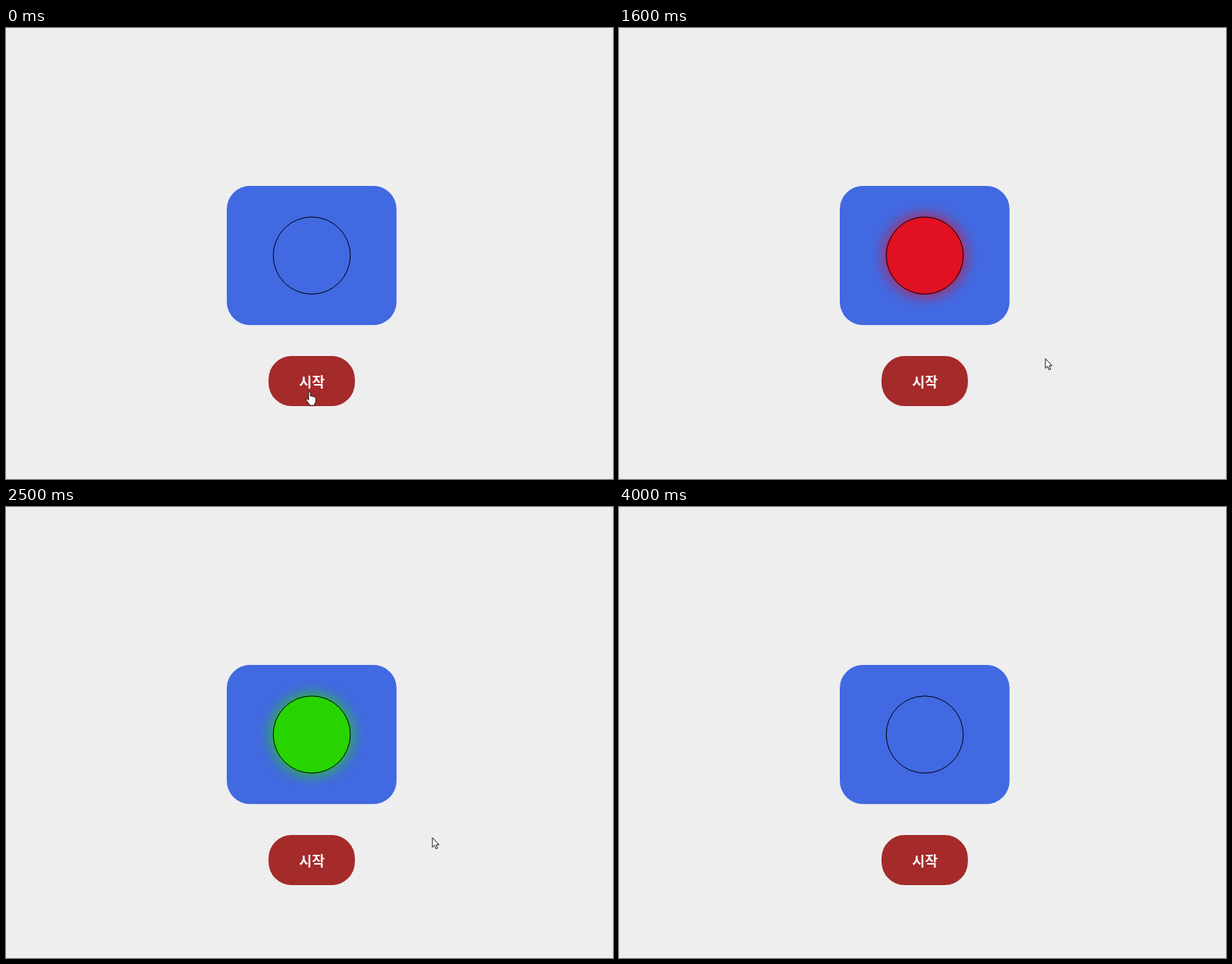
Write an HTML page that moves like this. It is 800x594 px and loops after 4.1 s.

```html
<!DOCTYPE html>
<html lang="ko">
<head>
<meta charset="utf-8">
<style>
  html, body { margin: 0; width: 100%; height: 100%; overflow: hidden; background: #eeeeef; }
  svg { display: block; width: 800px; height: 594px; }
  text { font-family: "Noto Sans CJK KR", "Noto Sans CJK", sans-serif; font-weight: 700; text-anchor: middle; }
</style>
</head>
<body>
<svg viewBox="0 0 800 594">
  <defs>
    <filter id="blur" x="-50%" y="-50%" width="200%" height="200%" color-interpolation-filters="sRGB">
      <feGaussianBlur stdDeviation="10"/>
    </filter>
  </defs>
  <text id="count" x="403" y="104" font-size="96"></text>
  <rect x="291" y="208" width="223.7" height="183.2" rx="30.5" fill="#4169e1"/>
  <g id="lamp">
    <circle cx="403" cy="299.7" r="51.2" filter="url(#blur)"/>
    <circle cx="403" cy="299.7" r="51"/>
  </g>
  <circle cx="403" cy="299.7" r="50.8" fill="none" stroke="#000"/>
  <rect x="346" y="432" width="113.8" height="66" rx="30.5" fill="#a52a2a"/>
  <text x="403.2" y="473" font-size="18.4" fill="#fff">시작</text>
  <g id="cursor" fill="#fff" stroke="#000" stroke-linejoin="round">
    <path id="arrow" stroke-width=".9" d="M.5.5V13.2L3.3 10.5 5.3 15.2 7.4 14.3 5.4 9.8H9.3Z"/>
    <path id="hand" stroke-width=".9" d="M-1.2 1C-1.2-.8 1.2-.8 1.2 1V5.4Q2.4 4.4 3.6 5.8 5 5 6 6.4 8.2 5.8 8.3 8V12Q8.2 14.2 6.8 15.4V17.6H-.2V16L-4.6 10.6Q-5.2 8.6-3.2 8.7L-1.2 10.6Z"/>
  </g>
</svg>
<script>
  const LOOP = 4100, STEP = 100, FADE = 200;
  const RED = [255, 0, 0], YELLOW = [255, 255, 0], GREEN = [0, 204, 0];
  const $ = id => document.getElementById(id);
  const ease = x => x * x * (3 - 2 * x);
  const progress = (t, start, length) => ease(Math.max(0, Math.min(1, (t - start) / length)));
  const mix = (a, b, k) => a.map((v, i) => v + (b[i] - v) * k);
  const show = (el, visible) => el.style.display = visible ? "" : "none";

  function drawCount(t) {
    $("count").textContent = t < 300 || t >= 1500 ? "" : 3 - Math.floor((t - 300) / 400);
  }

  function drawLamp(t) {
    const warm = mix(RED, YELLOW, progress(t, 1900, FADE));
    const color = mix(warm, GREEN, progress(t, 2350, FADE));
    $("lamp").setAttribute("fill", `rgb(${color.map(Math.round)})`);
    $("lamp").setAttribute("opacity", progress(t, 1450, FADE) - progress(t, 3700, 250));
  }

  function drawCursor(t) {
    const late = t >= 3800;
    const move = progress(t, 0, 600);
    const x = late ? 584 : 400 + 161.5 * move;
    const y = late ? 435 : 479.5 - 44.5 * move;
    const overButton = x < 458;
    $("cursor").setAttribute("transform", `translate(${x} ${y})`);
    show($("cursor"), t < 2900 || late && t < 4000);
    show($("hand"), overButton);
    show($("arrow"), !overButton);
  }

  function frame() {
    const t = Math.floor(performance.now() % LOOP / STEP) * STEP;
    drawCount(t);
    drawLamp(t);
    drawCursor(t);
    requestAnimationFrame(frame);
  }
  frame();
</script>
</body>
</html>
```
